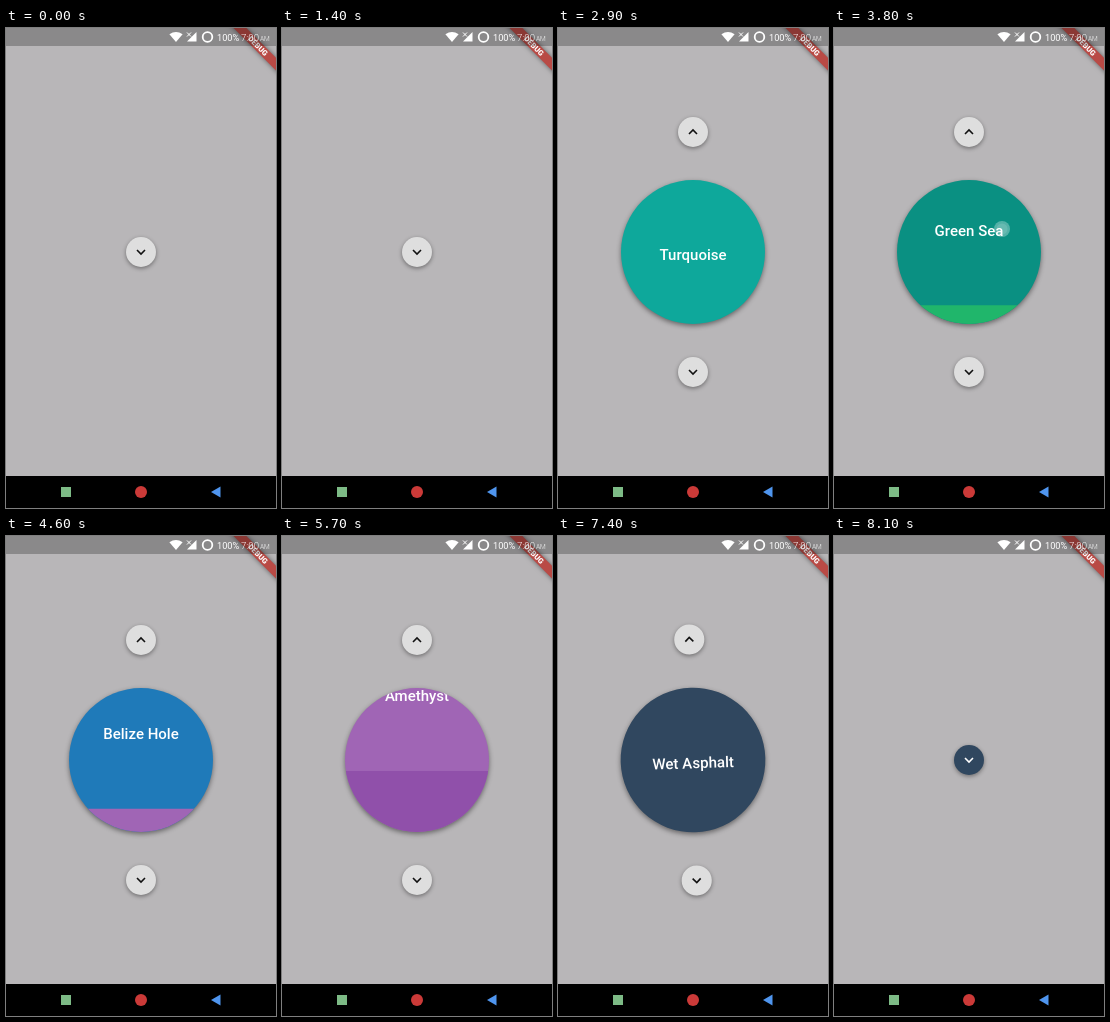
An HTML page with a canvas for the animation above (9200 ms loop, 270 by 480 pixels).

```html
<!DOCTYPE html>
<html lang="en">
<head>
<meta charset="utf-8">
<title>Circular colour picker</title>
<style>
  html, body { margin: 0; width: 100%; height: 100%; overflow: hidden; background: #b8b6b8; }
  canvas { display: block; width: 270px; height: 480px; }
</style>
</head>
<body>
<canvas id="stage" width="270" height="480"></canvas>
<script>
const ctx = document.getElementById('stage').getContext('2d');
const LOOP = 9200, STEP = 100, TAU = Math.PI * 2;
const CX = 135, CY = 224, RADIUS = 72, ORBIT = 120, PAGE = 150;
const OPEN_AT = 1735, CLOSED_AT = 8080, DURATION = 1020;
const FONT = 'Roboto, Arial, sans-serif';

const pages = [
  ['Turquoise', '#0ea89b'], ['Green Sea', '#0a9082'], ['Emerald', '#20b66b'],
  ['Nephritis', '#1fa75c'], ['Peter River', '#3090d2'], ['Belize Hole', '#1f7ab9'],
  ['Amethyst', '#a065b5'], ['Wisteria', '#9050aa'], ['Wet Asphalt', '#30475f']
];

// [time, page position]
const scroll = [
  [3000, 0], [3500, 1], [3700, 1], [3800, 1.165], [4600, 5.195], [5000, 6],
  [5500, 6], [5700, 6.447], [5950, 7], [6200, 7], [6700, 8]
];

const clamp = x => Math.min(1, Math.max(0, x));

function elasticOut(t) {
  if (t <= 0) return 0;
  if (t >= 1) return 1;
  return 1 + 2 ** (-10 * t) * Math.sin((t - 0.1) * TAU / 0.4);
}

function secant(i) {
  const a = scroll[i], b = scroll[i + 1];
  return a && b ? (b[1] - a[1]) / (b[0] - a[0]) : 0;
}

function slope(i) {
  const a = secant(i - 1), b = secant(i);
  return a * b > 0 ? 2 * a * b / (a + b) : 0;
}

// Monotone cubic through the scroll points
function pageAt(t) {
  const last = scroll.length - 1;
  if (t <= scroll[0][0]) return scroll[0][1];
  if (t >= scroll[last][0]) return scroll[last][1];
  const i = scroll.findIndex(p => p[0] > t) - 1;
  const [t0, p0] = scroll[i], [t1, p1] = scroll[i + 1];
  const h = t1 - t0, s = (t - t0) / h, r = 1 - s;
  return p0 * (1 + 2 * s) * r * r + p1 * s * s * (3 - 2 * s)
    + h * s * r * (slope(i) * r - slope(i + 1) * s);
}

function disc(x, y, r, fill) {
  ctx.fillStyle = fill;
  ctx.beginPath();
  ctx.arc(x, y, r, 0, TAU);
  ctx.fill();
}

function poly(points, fill) {
  ctx.fillStyle = fill;
  ctx.beginPath();
  points.forEach(p => ctx.lineTo(p[0], p[1]));
  ctx.fill();
}

function shadow(alpha, blur, dy) {
  ctx.shadowColor = `rgba(0,0,0,${alpha})`;
  ctx.shadowBlur = blur;
  ctx.shadowOffsetY = dy;
}

function label(text, x, y, font, align = 'left') {
  ctx.font = `${font} ${FONT}`;
  ctx.textAlign = align;
  ctx.fillStyle = '#fff';
  ctx.fillText(text, x, y);
}

function button(x, y, dir, fill, ink) {
  ctx.save();
  shadow(0.4, 4, 1.5);
  disc(x, y, 15, fill);
  ctx.restore();
  ctx.strokeStyle = ink;
  ctx.lineWidth = 1.6;
  ctx.beginPath();
  ctx.moveTo(x - 4, y - 2 * dir);
  ctx.lineTo(x, y + 2 * dir);
  ctx.lineTo(x + 4, y - 2 * dir);
  ctx.stroke();
}

function picker(v, pos) {
  if (v < 0.01) return;
  const first = Math.floor(pos);
  ctx.save();
  ctx.translate(CX, CY);
  ctx.rotate((1 - v) * TAU);
  ctx.scale(v, v);
  button(0, -ORBIT, -1, '#dedede', '#111');
  button(0, ORBIT, 1, '#dedede', '#111');
  ctx.save();
  shadow(0.45, 5, 2);
  disc(0, 0, RADIUS, pages[first][1]);
  ctx.restore();
  ctx.beginPath();
  ctx.arc(0, 0, RADIUS, 0, TAU);
  ctx.clip();
  for (let i = first; i <= first + 1 && i < pages.length; i++) {
    const top = -RADIUS + (i - pos) * PAGE;
    if (top >= RADIUS) break;
    if (i > first) {
      ctx.fillStyle = pages[i][1];
      ctx.fillRect(-RADIUS, top, RADIUS * 2, PAGE);
    }
    label(pages[i][0], 0, top + PAGE / 2 + 5.3, '500 15px', 'center');
  }
  ctx.restore();
}

function ribbon() {
  ctx.save();
  ctx.translate(270, 0);
  ctx.rotate(Math.PI / 4);
  ctx.save();
  shadow(0.5, 5, 0);
  ctx.fillStyle = '#b94a45';
  ctx.fillRect(-40, 21, 80, 9);
  ctx.restore();
  label('DEBUG', 0, 28.2, '900 7.6px', 'center');
  ctx.restore();
}

function statusBar() {
  ctx.fillStyle = 'rgba(0,0,0,0.25)';
  ctx.fillRect(0, 0, 270, 18);
  ctx.fillStyle = '#fff';
  ctx.beginPath();
  ctx.moveTo(170, 14);
  ctx.lineTo(163.4, 6.2);
  ctx.quadraticCurveTo(170, 1.8, 176.6, 6.2);
  ctx.fill();
  poly([[181, 13.5], [190.5, 4], [190.5, 13.5]], '#fff');
  ctx.strokeStyle = '#fff';
  ctx.lineWidth = 1;
  ctx.beginPath();
  ctx.moveTo(181, 4.5);
  ctx.lineTo(185, 8.5);
  ctx.moveTo(185, 4.5);
  ctx.lineTo(181, 8.5);
  ctx.stroke();
  ctx.lineWidth = 1.8;
  ctx.beginPath();
  ctx.arc(201.5, 9, 4.8, 0, TAU);
  ctx.stroke();
  label('100%', 211, 12.8, '400 9.2px');
  label('7:00', 235, 12.8, '300 9.6px');
  label('AM', 254, 12.8, '300 6.6px');
}

function navBar() {
  ctx.fillStyle = '#000';
  ctx.fillRect(0, 448, 270, 32);
  ctx.fillStyle = '#7dbb86';
  ctx.fillRect(55, 459, 10, 10);
  disc(135, 464, 6, '#cb3a38');
  poly([[205, 464], [214.5, 458.5], [214.5, 469.5]], '#4f95ee');
}

function draw(t) {
  const v = t < 5000
    ? elasticOut(clamp((t - OPEN_AT) / DURATION))
    : elasticOut(clamp((CLOSED_AT - t) / DURATION));
  const pos = pageAt(t);

  ctx.fillStyle = '#b8b6b8';
  ctx.fillRect(0, 0, 270, 480);
  if (t < 5000) button(CX, CY, 1, '#dedede', '#111');
  else button(CX, CY, 1, pages[8][1], '#fff');
  picker(v, pos);
  if (t >= 3700 && t <= 3900) {
    disc(168, 201 - (pos - 1.165) * PAGE, 8, 'rgba(255,255,255,0.3)');
    disc(168, 201 - (pos - 1.165) * PAGE, 5.5, 'rgba(255,255,255,0.12)');
  }
  ribbon();
  statusBar();
  navBar();
}

const start = performance.now();
function tick() {
  const t = (performance.now() - start) % LOOP;
  draw(Math.floor(t / STEP) * STEP);
  requestAnimationFrame(tick);
}
tick();
</script>
</body>
</html>
```
